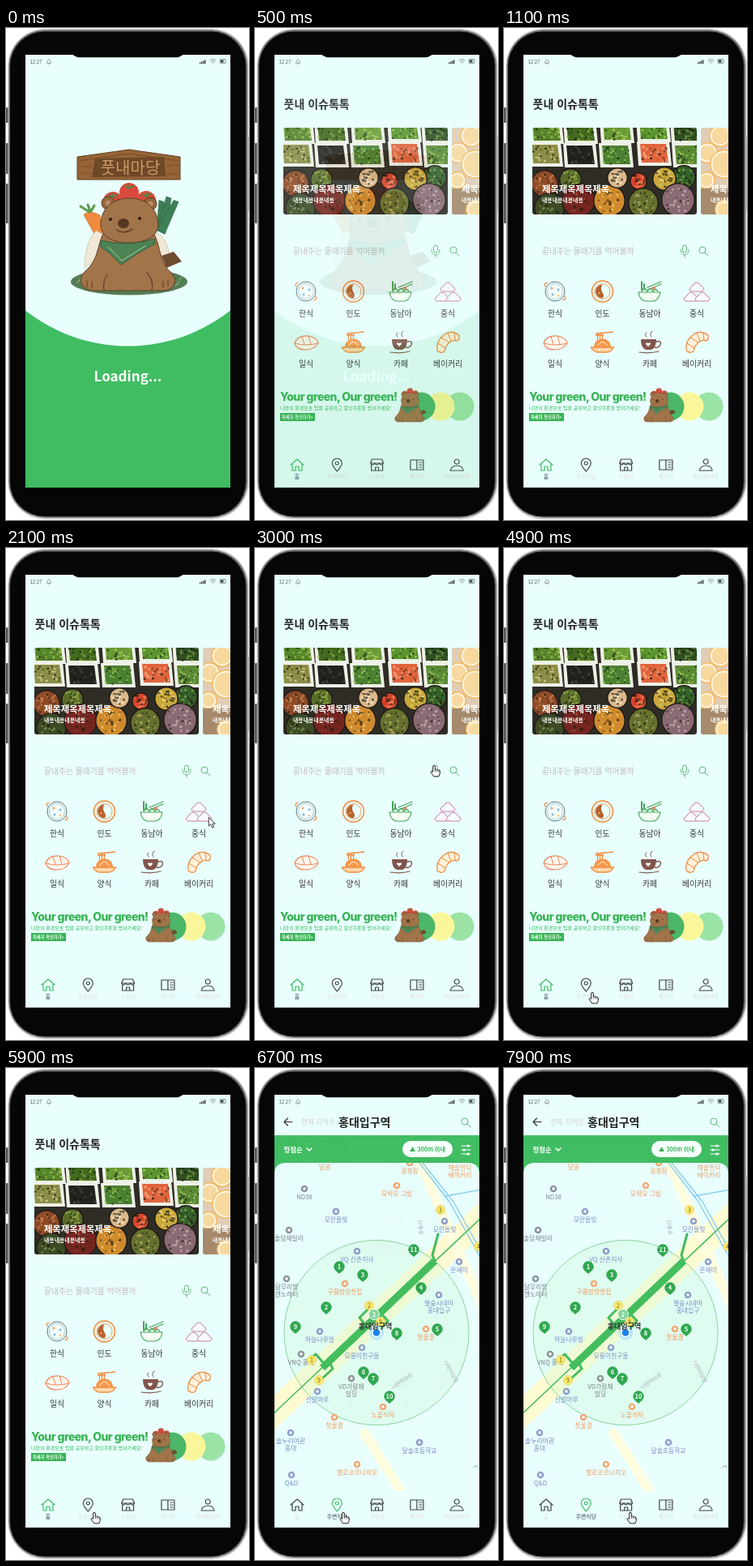
Animation, 300 px wide and 607 px high, one loop 8 s. Source, as an HTML page:

```html
<!DOCTYPE html>
<html lang="ko">
<head>
<meta charset="utf-8">
<title>App walkthrough</title>
<style>
  html, body { margin: 0; width: 100%; height: 100%; overflow: hidden; background: #fff; }
  svg { display: block; width: 100vw; height: 100vh; }
  text { font-family: "Noto Sans CJK KR", "Noto Sans CJK", "Noto Sans", sans-serif; }
</style>
</head>
<body>
<svg id="stage" viewBox="0 0 300 607"></svg>
<script>
const GREEN = '#40bd62', PAPER = '#e8fffe', INK = '#222', ORANGE = '#f08a3c';

const text = (x, y, size, str, fill = INK, extra = '') =>
  `<text x="${x}" y="${y}" font-size="${size}" fill="${fill}" ${extra}>${str}</text>`;
const MID = 'text-anchor="middle" ', BOLD = 'font-weight="700"';
const circle = (x, y, r, fill, extra = '') => `<circle cx="${x}" cy="${y}" r="${r}" fill="${fill}" ${extra}/>`;
const oval = (x, y, rx, ry, fill, extra = '') =>
  `<ellipse cx="${x}" cy="${y}" rx="${rx}" ry="${ry}" fill="${fill}" ${extra}/>`;
const rect = (x, y, w, h, fill, rx = 0, extra = '') =>
  `<rect x="${x}" y="${y}" width="${w}" height="${h}" fill="${fill}" rx="${rx}" ${extra}/>`;
const shape = (d, fill, extra = '') => `<path d="${d}" fill="${fill}" ${extra}/>`;
const line = (d, stroke, width = 1, extra = '') =>
  `<path d="${d}" fill="none" stroke="${stroke}" stroke-width="${width}" stroke-linecap="round" stroke-linejoin="round" ${extra}/>`;
const at = (x, y, body, more = '') => `<g transform="translate(${x} ${y}) ${more}">${body}</g>`;

let seed = 11;
const random = () => (seed = seed * 16807 % 2147483647) / 2147483647;

// ---- Mascot and splash ----
const edge = 'stroke="#5d3f28" stroke-width="1"';
const tomato = (x, y) => circle(x, y, 12, '#d94a3d') + line(`M${x - 5} ${y - 8} l5 3 l6 -4 M${x} ${y - 5} v-5`, '#4e8a45', 1.6);
const bear =
  tomato(132, 214) + tomato(173, 213) + tomato(152, 203) +
  shape('M192 281 L207 276 L217 288 L198 296Z', '#6f4b2d') +
  shape('M122 250 C112 266 116 284 98 300 C88 309 92 322 106 324 L194 324 C209 323 213 311 203 301 C187 286 192 266 180 250Z', '#a2744a', edge) +
  circle(126, 216, 8, '#94663d', edge) + circle(178, 217, 8, '#94663d', edge) +
  circle(126, 216, 3.5, '#c08a63') + circle(178, 217, 3.5, '#c08a63') +
  shape('M117 243 C117 222 132 210 152 210 C173 210 187 222 188 243 C188 257 171 265 152 265 C132 265 117 257 117 243Z', '#a2744a', edge) +
  shape('M117 262 Q150 271 183 260 L184 266 Q164 276 142 292 Q130 278 117 270Z', '#4c8355', 'stroke="#2f5f3c"') +
  line('M126 270 L143 287 L172 269', '#a8cfa4', 1) +
  oval(145, 241, 7, 6, '#54371f') + circle(129, 236, 2, '#2d1d12') + circle(165, 235, 2, '#2d1d12') +
  line('M136 249 Q146 255 156 248', '#54371f', 1.2) +
  line('M125 304 Q119 313 121 323 M174 302 Q183 312 180 323', '#5d3f28', 1.2) +
  line('M100 312 v8 M106 313 v8 M194 312 v8 M200 311 v7', '#5d3f28', 1);

const leek = x => shape(`M186 249 L${x} ${208 + Math.abs(x - 198) / 2} l6 2 L196 254Z`, '#3e7f55', 'stroke="#2b5d40" stroke-width=".6"');

const splash =
  rect(24, 33, 253, 534, GREEN) + circle(150.5, 188.5, 204, PAPER) +
  oval(152, 313, 72, 16.5, '#557d52') +
  line('M88 314 l5 -5 M200 319 l7 -5 M209 318 l5 -5 M214 311 l3 -4', '#86ab78', 1.2) +
  [189, 198, 207].map(leek).join('') +
  shape('M96 230 Q103 224 116 231 L119 253 L109 254Z', ORANGE, 'stroke="#c96a25" stroke-width=".7"') +
  line('M103 227 l-11 -7 M104 226 l-3 -8 M105 226 l4 -7', '#5b9b4c', 3) +
  shape('M111 250 Q97 265 97 296 L115 281 L123 256Z', '#f0e8d6', 'stroke="#c9baa0" stroke-width=".7"') +
  shape('M183 252 Q201 256 203 292 L188 284 L180 260Z', '#f0e8d6', 'stroke="#c9baa0" stroke-width=".7"') +
  `<g id="bear">${bear}</g>` +
  shape('M88 159 L152 150 L215 159 V187 H88Z', '#956336', 'stroke="#5f3f22" stroke-width="1"') +
  line('M90 164 L152 155 L213 164 M91 171 H105 M199 170 H213 M91 179 H105 M198 180 H213', '#754a27', .9) +
  shape('M110 161 L195 159 L197 183 L106 184Z', '#6e4827') +
  text(153.5, 179.5, 20, '풋내마당', '#c99a63', MID) +
  text(150.5, 435.5, 17, 'Loading...', '#fff', MID + BOLD);

// ---- Shared chrome ----
const magnifier = (x, y, color = '#65b67c') =>
  circle(x - 1, y - 1, 4, 'none', `stroke="${color}"`) + line(`M${x + 2} ${y + 2} l4 4`, color);

const pinOutline = 'M0 8 C-4 3 -6 1 -6 -2 A6 6 0 0 1 6 -2 C6 1 4 3 0 8Z';
const navIcons = [
  c => line('M-8 0 L0 -7 L8 0 M-6 -1 V7 H-2 V2 H2 V7 H6 V-1', c, 1.2),
  c => line(pinOutline, c, 1.2) + circle(0, -2, 2, 'none', `stroke="${c}" stroke-width="1.2"`),
  c => line('M-7 0 V7 H7 V0 M-6 -7 H6 L8 -2 H-8Z M-8 -2 q2.7 4 5.3 0 q2.7 4 5.4 0 q2.6 4 5.3 0 M-2 7 V3 H2 V7', c, 1.2),
  c => line('M-8 -6 H8 V6 H-8Z M0 -6 V6 M3 -3 H6 M3 0 H6 M3 3 H6', c, 1.2),
  c => circle(0, -4, 3, 'none', `stroke="${c}" stroke-width="1.2"`) + line('M-8 7 Q-7 1 0 1 Q7 1 8 7Z', c, 1.2),
];
const nav = active => ['홈', '주변식당', '스토어', '매거진', '마이페이지'].map((label, i) => {
  const x = 52 + i * 49.3, on = i === active;
  return at(x, 539, navIcons[i](on ? GREEN : '#444')) + text(x, 556, 6.8, label, on ? '#345' : '#e6d8dc', MID);
}).join('');

// ---- Home ----
const crumbs = (x, y, rx, ry, light) => Array.from({ length: 34 }, () => {
  const px = x + (random() * 2 - 1) * rx, py = y + (random() * 2 - 1) * ry;
  return circle(px.toFixed(1), py.toFixed(1), (.8 + random()).toFixed(1), random() < .55 ? light : '#161a0c', 'opacity=".6"');
}).join('');

function foodPhoto() {
  const trays = [
    [52, 128, '#55842a', '#b4d75c'], [94, 128, '#41691f', '#9fc54a'], [139, 127, '#6a9a35', '#c3df70'],
    [184, 126, '#5a9430', '#b5da64'], [226, 128, '#2f4f22', '#7fa84a'],
    [51, 156, '#8a8d45', '#e3dda0'], [94, 157, '#24221e', '#56544c'], [138, 157, '#4a8030', '#a8d268'],
    [185, 155, '#e0643c', '#ffb38c'], [228, 157, '#5a8a34', '#b2d76e'],
  ];
  const bowls = [
    [50, 192, 17, '#8c4a28', '#d98a50'], [82, 187, 14, '#596d2a', '#a8bd58'], [222, 184, 15, '#35612a', '#8fbd55'],
    [198, 186, 15, '#c9a83c', '#f3df8c'], [56, 222, 19, '#3c4a25', '#8a9b50'], [92, 213, 21, '#74251f', '#b85a48'],
    [130, 213, 20, '#d08a2e', '#f5cf68'], [140, 185, 13, '#dcb88a', '#fff0d4'], [166, 189, 11, '#d8412a', '#f58a60'],
    [172, 216, 19, '#65702f', '#d7c47a'], [215, 212, 21, '#8a6a72', '#d8c2c8'],
  ];
  return rect(35, 123, 203, 107, '#2e2c24') +
    trays.map(([x, y, food, light]) =>
      shape(`M${x - 21} ${y - 15} h40 l3 30 h-41Z`, '#eef1e8') +
      shape(`M${x - 17} ${y - 12} h32 l3 23 h-33Z`, food) + crumbs(x, y, 16, 11, light)).join('') +
    bowls.map(([x, y, r, food, light]) =>
      circle(x, y, r, '#211c17') + circle(x, y, r - 1.5, food) + crumbs(x, y, r * .66, r * .66, light)).join('');
}
const citrus = (x, y, r) => circle(x, y, r, '#f4b860') + circle(x, y, r - 1.5, '#fff4dc') + circle(x, y, r - 3.5, '#f7d9a0');
const fruitPhoto = rect(243, 123, 40, 107, '#e0cdb4') + citrus(267, 133, 14) + citrus(251, 154, 13) +
  citrus(272, 168, 18) + citrus(250, 188, 11) + rect(243, 198, 40, 32, '#a58a6c') + citrus(272, 224, 12);
const cardText = x => text(x, 203, 11.3, '제목제목제목제목', '#fff', BOLD) + text(x, 215, 6.9, '내용내용내용내용', '#fff', BOLD);

const dumpling = (x, y) => at(x, y, shape('M-9 4 Q-9 1 -5 -1 Q-3 -5 0 -5 Q3 -5 5 -1 Q9 1 9 4 Q8 6 5 6 H-5 Q-8 6 -9 4Z', '#f6fbfb', 'stroke="#cf7ca5"'));
const categories = [
  ['한식', circle(0, 0, 12, 'none', 'stroke="#66747c"') + circle(0, 0, 9.5, '#f2fbfb', 'stroke="#9eb4bb" stroke-width=".7"') +
    line('M-12 -6 l-1 -3 l3 -2 M12 6 l1 3 l-3 2', ORANGE, 1.2) +
    circle(-4, -4, 1.4, '#f0a25a') + circle(4, -2, 1.4, '#7db7d5') + circle(-3, 4, 1.4, '#7db7d5') + circle(4, 5, 1.2, '#f0c85a')],
  ['인도', circle(0, 0, 13, 'none', `stroke="${ORANGE}" stroke-width="1.5"`) + circle(0, 0, 9.5, 'none', `stroke="${ORANGE}" stroke-width=".8"`) +
    shape('M0 -8.5 A8.5 8.5 0 0 0 0 8.5 Q3 5 0 1 Q-3 -4 0 -8.5Z', '#b5622f') + circle(-4, 2, 1, '#ffd27b')],
  ['동남아', shape('M-14 1 H13 Q11 12 3 12 H-4 Q-12 12 -14 1Z', '#f4fff4', 'stroke="#48a458" stroke-width="1.2"') +
    line('M-10 0 q3 -7 7 0 q3 -7 7 0 q3 -5 6 0 M-3 -5 L14 -12 M0 -3 L14 -9', '#48a458', 1.3) +
    line('M-10 -2 V-12 M-7 -3 V-9', '#48a458', 2) + circle(5, -4, 2, '#e5825f')],
  ['중식', dumpling(0, -6) + dumpling(-7, 6) + dumpling(7, 6)],
  ['일식', shape('M-14 2 Q-11 -8 3 -7 Q14 -5 15 2 Q10 10 0 10 Q-12 10 -14 2Z', '#fff6ef', 'stroke="#e98a5c" stroke-width="1.1"') +
    line('M-14 2 Q0 6 15 2 M-5 -6 l3 9 M3 -7 l3 10', '#e98a5c')],
  ['양식', shape('M-14 7 H14 Q11 13 5 13 H-5 Q-11 13 -14 7Z', '#ffd9ac', `stroke="${ORANGE}" stroke-width="1.3"`) +
    shape('M-10 6 Q-9 -3 0 -3 Q9 -3 10 6Z', '#f79a4e', `stroke="${ORANGE}"`) +
    line('M-6 5 q6 -10 12 0', '#fff0d8', 1) + line('M-8 -10 L13 -12 M-8 -8 H1 M-6 -10 V-3 M-3 -10 V-3 M0 -10 V-3', ORANGE, 1.3)],
  ['카페', shape('M-11 -3 H8 Q8 9 1 10 H-4 Q-11 9 -11 -3Z', '#80554c') + line('M8 0 q7 -2 5 4 q-2 4 -7 3', '#80554c', 1.4) +
    line('M-13 13 Q0 15 11 12', '#80554c', 1.2) + line('M-4 -6 q-3 -3 0 -5 M2 -6 q-3 -4 1 -7', '#80554c', 1) +
    shape('M-2 6 l-3 -3 q0 -3 3 -1 q3 -2 3 1Z', '#fff')],
  ['베이커리', shape('M-13 11 Q-15 -1 -4 -9 Q5 -15 14 -8 Q15 -3 12 -1 Q6 -3 2 1 Q-3 5 -4 12 Q-9 15 -13 11Z', '#fff1da', `stroke="${ORANGE}" stroke-width="1.2"`) +
    line('M-12 2 L-3 8 M-8 -5 L2 1 M0 -11 L4 -1 M8 -11 L9 -2', ORANGE)],
].map(([label, icon], i) => {
  const x = [63, 121.5, 180, 238][i % 4], y = i < 4 ? 325 : 387;
  return at(x, y, icon) + text(x, y + 30.5, 9.8, label, '#333', MID);
}).join('');

const home =
  rect(24, 33, 253, 534, PAPER) + text(35.5, 98.5, 14, '풋내 이슈톡톡', INK, BOLD) +
  `<g clip-path="url(#cards)">${foodPhoto()}${fruitPhoto}${cardText(47)}${cardText(255)}</g>` +
  text(47, 278.5, 9.8, '끝내주는 풀때기를 먹어볼까', '#c4b9ba') +
  rect(220.5, 268, 5, 9, 'none', 2.5, 'stroke="#65b67c"') + line('M218 273 q0 7 5 7 q5 0 5 -7 M223 280 v3', '#65b67c', .9) +
  magnifier(246, 275) + categories +
  text(31, 459.5, 14, 'Your green, Our green!', '#36b353', 'style="font-family:Inter,sans-serif" letter-spacing="-.55" font-weight="800"') +
  text(31, 471, 6, '나만의 환경보호 팁을 공유하고 할인쿠폰을 받아가세요!', '#36b353') +
  rect(31, 475, 43, 10, '#36b353') + text(33, 482.3, 5.3, '자세히 확인하기&gt;', '#fff', BOLD) +
  circle(253, 467, 17.5, '#9be3a5') + circle(229, 467, 17.5, '#faf79a') + circle(205, 467, 17.5, '#4cb669') +
  '<use href="#bear" transform="translate(143.5 384) scale(.315)"/>' + nav(0);

// ---- Map ----
const BLUE = '#7b8fc4', GRAY = '#7c828c', TAN = '#f29a5c';
const places = [
  [86, 125, TAN, '달콩'], [191, 130, TAN, '콩볶장'], [253, 126, TAN, '해솔언덕', '베이커리'], [61, 162, GRAY, 'ND38'],
  [175, 158, TAN, '모락모 그릴'], [100, 190, BLUE, '모란들빛'], [234, 202, BLUE, '모란들빛'], [42, 213, GRAY, '솔담재빌라'],
  [126, 239, BLUE, 'VQ 신촌지사'], [252, 252, BLUE, '온새미'], [39, 273, GRAY, '달무리밤', '앤노래터'],
  [111, 279, TAN, '구름방앗찻집'], [227, 293, BLUE, '별숲시네마', '홍대입구'], [80, 338, BLUE, '하늘나루빌'],
  [57, 366, GRAY, 'VNQ 홍대'], [132, 358, BLUE, '모롱이친구들'], [211, 335, TAN, '찻물결'], [119, 396, GRAY, 'VD가람채', '빌딩'],
  [77, 412, BLUE, '신발마루'], [158, 431, TAN, '노을식탁'], [98, 444, TAN, '찻물결'], [44, 463, BLUE, '솔누리여관', '홍대'],
  [203, 475, BLUE, '달솔초등학교'], [126, 502, TAN, '벨로코르나치오'], [45, 515, BLUE, 'Q&amp;D'],
].map(([x, y, color, ...lines]) =>
  circle(x, y - 13, 4.3, color, 'opacity=".85"') + rect(x - 1.5, y - 14.8, 3, 3.4, '#fff', .7) +
  lines.map((s, i) => text(x, y + i * 9, 7.8, s, color, MID)).join('')).join('');

const exits = [[70, 360, 1], [79, 385, 9], [141, 293, 2], [155, 313, 8], [229, 175, 3], [276, 220, 4]].map(([x, y, n]) =>
  circle(x, y, 5.5, '#ffe96b', 'stroke="#cfc05c" stroke-width=".6"') + text(x, y + 2.6, 7, n, '#665e28', MID)).join('');

const pins = [[104, 245], [88, 295], [133, 255], [205, 271], [225, 322], [134, 375], [146, 383], [175, 327], [50, 319], [166, 405], [196, 224]]
  .map(([x, y], i) => at(x, y, shape('M0 9 L-4.5 5 A6.7 6.7 0 1 1 4.5 5Z', '#2fa84f') + text(0, 2.8, 7.5, i + 1, '#fff', MID + BOLD))).join('');

const street = (x, y, angle, name) => at(x, y, text(0, 0, 6.5, name, '#a3a8ac', MID), `rotate(${angle})`);

const map =
  rect(24, 33, 253, 534, PAPER) + rect(24, 83, 253, 60, GREEN) +
  line('M46 66.5 H36 M40.5 62 L36 66.5 L40.5 71', '#333', 1.2) +
  text(57, 70, 8.6, '현재 지역은', '#dccfd0') + text(103, 71.5, 14, '홍대입구역', INK, BOLD) + magnifier(260, 67) +
  text(35.5, 104, 8.4, '평점순', '#fff', BOLD) + line('M64 99 l3 3 l3 -3', '#fff', 1.5) +
  rect(182, 90, 62, 20, '#f6fffd', 10) + text(213, 103, 7.2, '▲ 300m 이내', '#36b353', MID + BOLD) +
  line('M255 96 H266 M255 101 H266 M255 106 H266', '#fff', 1.2) + circle(263, 96, 1.6, '#fff') + circle(258, 101, 1.6, '#fff') + circle(263, 106, 1.6, '#fff') +
  `<g clip-path="url(#map)">${rect(24, 117, 253, 405, PAPER)}` +
  line('M10 438 L290 175', '#fffbd2', 31) + line('M205 120 L290 315 M135 450 L185 530', '#fffde0', 12) +
  circle(150, 326.5, 114, '#cff5d8', 'fill-opacity=".35" stroke="#83cf91" stroke-width=".9"') +
  line('M203 117 L240 165 L280 237 M207 117 L245 165 L280 228 M235 158 L280 150', '#85cdf0', 1.3) +
  line('M20 429 L280 184', '#43bd5e', 1.6) +
  '<path d="M83 370 L222 238" stroke="#43bd5e" stroke-width="9"/>' +
  line('M222 238 L219 231 L226 205 M137 318 L129 308 L141 296 M155 302 L164 312 L156 321 M88 368 L75 353 L66 361 M92 363 L96 371 L83 383', '#43bd5e', 3) +
  places + street(183, 388, -35, '나란마당로') + street(240, 376, 62, '나란마당로') + street(202, 197, 84, '단풍로') +
  exits + pins + at(147, 304, circle(0, 0, 6.5, '#82d79a', 'stroke="#fff"') + text(0, 2.6, 7.5, 2, '#fff', MID + BOLD)) +
  circle(150, 326.5, 9, '#9edbff', 'opacity=".6"') + circle(150, 326.5, 5, '#1783e8', 'stroke="#fff" stroke-width="1.3"') +
  text(148.5, 322, 9, '홍대입구역', '#333', MID + BOLD) + '</g>' +
  line('M270 493 l2.5 -3 l2.5 3', '#8aa', 1) + nav(1);

// ---- Phone, status bar, pointer ----
const phone =
  rect(0, 98, 4, 19, '#555', 1) + rect(0, 142, 4, 38, '#555', 1) + rect(0, 192, 4, 49, '#555', 1) + rect(296, 134, 4, 92, '#999', 1) +
  rect(2.5, 1, 297, 605, '#c4c6c6', 46) + rect(3.5, 2.5, 294.5, 601.5, '#666', 44.5) + rect(5, 4.5, 291, 598, '#060606', 42.5);

const status =
  text(29.5, 43.6, 6, '12:27', '#555') + line('M50.5 43 q1 -1 1 -3 q1.5 -3 3 0 q0 2 1 3Z M52.5 44.4 h1', '#777', .7) +
  [0, 1, 2, 3].map(i => rect(239 + i * 2, 42.5 - i, 1.3, 1.7 + i, '#333')).join('') +
  line('M252 40 q3.5 -3 7 0 M253.4 41.7 q2.1 -1.8 4.2 0 M255.5 43.4 v.1', '#777', .8) +
  rect(264, 38.6, 7, 4.8, 'none', 1, 'stroke="#555" stroke-width=".7"') + rect(265, 39.6, 3.5, 2.8, '#333');

const arrow = shape('M0 0 V11 L2.6 8.7 L4.5 13 L6.4 12.1 L4.6 8 H8Z', '#fff', 'stroke="#222" stroke-width=".9"');
const hand = shape('M-1.3 1 Q0 -.7 1.3 1 V5.4 Q2.7 4.2 3.6 5.7 Q5 4.9 5.8 6.3 Q7.3 5.8 7.3 7.5 V10 Q6.6 12 6 13.8 H-.5 Q-2 11 -4 8.6 Q-4 6.7 -1.3 8.3Z', '#fff',
  'stroke="#222" stroke-width="1" stroke-linejoin="round"') + line('M1.3 5.4 V8 M3.6 6 V8 M5.8 6.6 V8.3', '#222', .7);

const stage = document.getElementById('stage');
stage.innerHTML = `<defs>
  <clipPath id="screen">${rect(24, 33, 253, 534, '#000')}</clipPath>
  <clipPath id="cards">${rect(35, 123, 203, 107, '#000', 3)}${rect(243, 123, 45, 107, '#000', 3)}</clipPath>
  <clipPath id="map"><path d="M24 522 V131 Q24 117 38 117 H263 Q277 117 277 131 V522Z"/></clipPath>
</defs>${phone}<g clip-path="url(#screen)">
  ${splash}<g id="homePage">${home}</g><g id="mapPage">${map}</g>${status}
  <g id="pointer"><g id="arrow">${arrow}</g><g id="hand">${hand}</g></g>
</g>${shape('M80 32 H221 Q218 33 216 34.5 Q214 36.3 209 36.3 H92 Q87 36.3 85 34.5 Q83 33 80 32Z', '#060606')}`;

const [homePage, mapPage, pointer, arrowPart, handPart] =
  ['homePage', 'mapPage', 'pointer', 'arrow', 'hand'].map(id => document.getElementById(id));

// ---- Motion ----
const LOOP = 8000;
const clamp = v => Math.min(1, Math.max(0, v));
const fadeIn = (t, start) => 1 - (1 - clamp((t - start) / 500)) ** 3;
const smooth = v => v * v * (3 - 2 * v);
const route = [[2000, 252, 336], [2700, 221, 268], [3200, 221, 268], [3800, 129, 490], [4500, 109, 548], [6700, 109, 548], [7300, 156, 548], [LOOP, 156, 548]];

function pointerAt(t) {
  const i = Math.max(1, route.findIndex(p => p[0] > t));
  const [t0, x0, y0] = route[i - 1], [t1, x1, y1] = route[i];
  const k = smooth(clamp((t - t0) / (t1 - t0)));
  return [x0 + (x1 - x0) * k, y0 + (y1 - y0) * k];
}

function draw(now) {
  const t = now % LOOP, [x, y] = pointerAt(t);
  homePage.setAttribute('opacity', fadeIn(t, 240));
  mapPage.setAttribute('opacity', fadeIn(t, 6300));
  pointer.setAttribute('transform', `translate(${x} ${y})`);
  pointer.style.display = t < route[0][0] ? 'none' : '';
  const overLink = y > 528 || (Math.abs(x - 222) < 7 && y < 283);
  handPart.style.display = overLink ? '' : 'none';
  arrowPart.style.display = overLink ? 'none' : '';
}

const start = performance.now();
function frame() {
  draw(performance.now() - start);
  requestAnimationFrame(frame);
}
frame();
</script>
</body>
</html>
```
